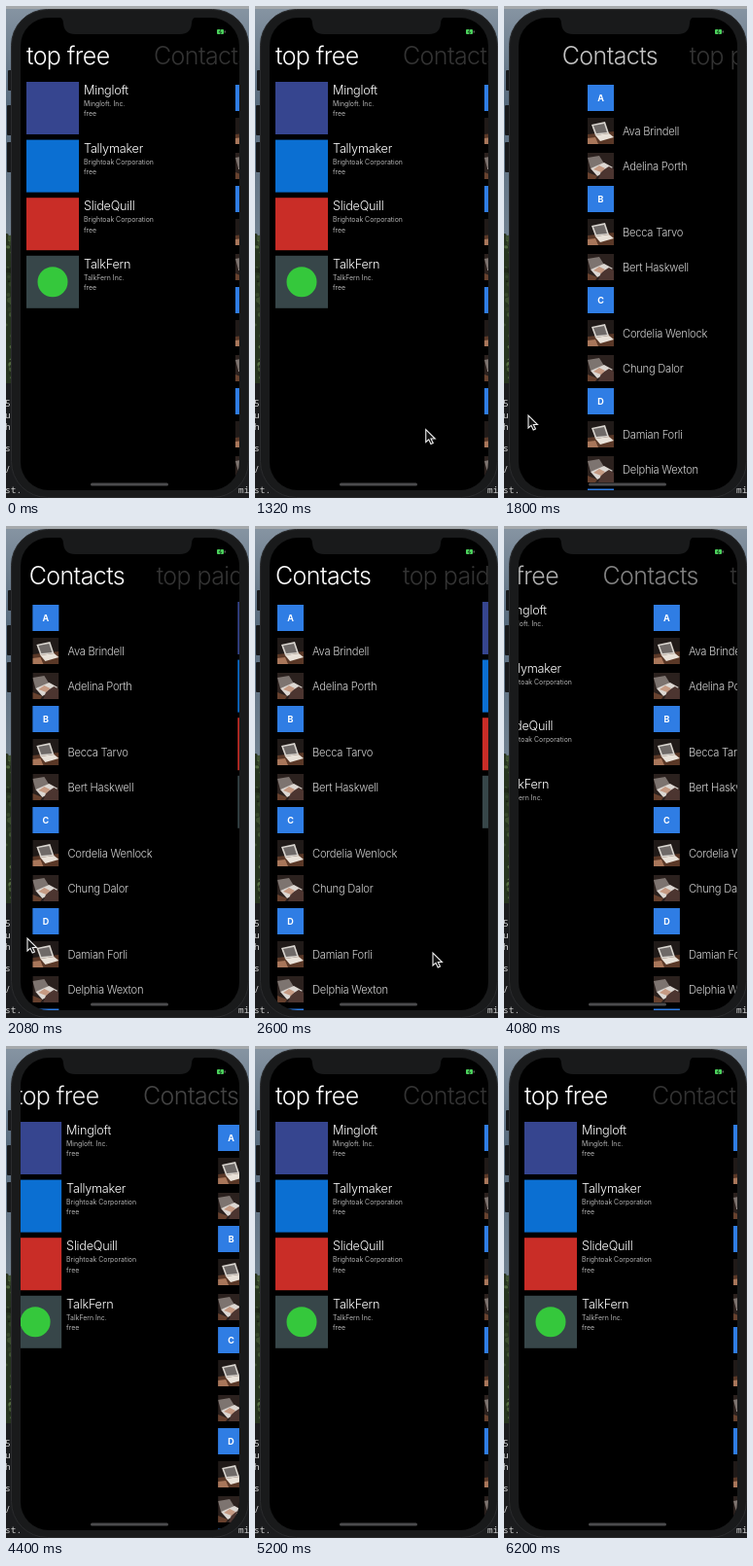
Animation of 250 by 506 pixels, one loop 6.64 s. Source, as an HTML page:

```html
<!DOCTYPE html>
<html lang="en">
<head>
<meta charset="utf-8">
<title>Panorama pages</title>
<style>
  html, body { margin: 0; width: 100%; height: 100%; overflow: hidden; background: #1b1c1e; }
  svg { display: block; }
  text { font-family: Inter, Roboto, sans-serif; font-weight: 300; fill: #fff; }
  .title { font-size: 25px; letter-spacing: -.6px; }
  .app { font-size: 12.7px; letter-spacing: -.25px; }
  .small { font-size: 6.9px; font-weight: 400; fill: #b4b4b4; }
  .letter { font-size: 9px; font-weight: 700; text-anchor: middle; }
  .person { font-size: 11.2px; letter-spacing: -.25px; fill: #d2d2d2; }
  .term text { font: 9.5px "Noto Sans Mono", "DejaVu Sans Mono", monospace; fill: #cfcfcf; }
</style>
</head>
<body>
<svg width="250" height="506" viewBox="0 0 250 506">
  <defs>
    <linearGradient id="sky" x2="0" y2="1">
      <stop offset="0" stop-color="#8795a3"/>
      <stop offset=".25" stop-color="#586b7d"/>
      <stop offset="1" stop-color="#8d99a4"/>
    </linearGradient>
    <clipPath id="screen"><rect x="15" y="12" width="225" height="486" rx="29"/></clipPath>
    <clipPath id="thumb"><rect width="27" height="27"/></clipPath>
    <g id="laptop" clip-path="url(#thumb)">
      <rect width="27" height="27" fill="#201a18"/>
      <path d="M0 17L27 14V27H0z" fill="#5a3827"/>
      <path d="M4 7L18 4L22 16L8 18z" fill="#d9d5cf"/>
      <path d="M6 8L17 6L20 15L9 16z" fill="#6f6a68"/>
      <path d="M8 18L22 16L27 20L13 24z" fill="#e9e2d9"/>
      <path d="M0 21L8 20L11 27H0z" fill="#a8765a"/>
    </g>
    <g id="desk" clip-path="url(#thumb)">
      <rect width="27" height="27" fill="#2b211e"/>
      <path d="M0 5L12 3L17 11L3 16z" fill="#7d7470"/>
      <path d="M3 16L17 10L26 15L10 24z" fill="#dcd7d2"/>
      <path d="M11 27L14 19L22 14L27 17V27z" fill="#4c3530"/>
      <path d="M6 17L12 13L18 16L14 20z" fill="#c59a83"/>
      <path d="M0 20L10 24L8 27H0z" fill="#67412e"/>
    </g>
  </defs>

  <rect width="250" height="400" fill="url(#sky)"/>
  <rect width="250" height="3" fill="#a5a9ac"/>
  <g id="trees"><rect y="238" width="250" height="152" fill="#26341f"/></g>
  <rect y="388" width="250" height="118" fill="#1b1c1e"/>
  <g class="term" id="term"></g>

  <g fill="#17181a">
    <rect x="2" y="66" width="5" height="21" rx="1"/>
    <rect x="1" y="102" width="6" height="31" rx="1"/>
    <rect x="1" y="140" width="6" height="31" rx="1"/>
  </g>
  <rect x="5.5" y="3.5" width="244" height="502" rx="37" fill="#191a1b" stroke="#2a2b2d"/>
  <rect x="15" y="12" width="225" height="486" rx="29"/>

  <g id="pages" clip-path="url(#screen)"></g>

  <path d="M52 11H198Q191 11 191 18Q190 29 179 29H71Q60 29 59 18Q59 11 52 11z" fill="#191a1b"/>
  <rect x="217" y="24" width="7" height="5" rx="1" fill="#4bd05c"/>
  <path d="M221 24L219.500 27H221.500L220.500 29" fill="none" stroke="#0b2a10" stroke-width=".8"/>
  <rect x="224.700" y="25.500" width="1" height="2" fill="#8a8a8a"/>
  <rect x="87" y="490.500" width="80" height="3" rx="1.500" fill="#4b4b4d"/>
  <path id="cursor" d="M0 0V13L3 10.300L5.200 15L7.500 14L5.300 9.500H9.500z" fill="#111" stroke="#eee" stroke-width="1.100"/>
</svg>

<script>
const LOOP = 6640, STEP = 40, PAGE = 213, TITLE_GAP = 131;
const $ = id => document.getElementById(id);
const text = (cls, x, y, s) => `<text class="${cls}" x="${x}" y="${y}">${s}</text>`;
const rect = (x, y, w, h, fill) => `<rect x="${x}" y="${y}" width="${w}" height="${h}" fill="${fill}"/>`;

const apps = [
  ["Mingloft", "Mingloft. Inc.", "#36458f"],
  ["Tallymaker", "Brightoak Corporation", "#0b6fd2"],
  ["SlideQuill", "Brightoak Corporation", "#c92d27"],
  ["TalkFern", "TalkFern Inc.", "#374649"]
];
const people = [
  ["Ava Brindell", "Adelina Porth"],
  ["Becca Tarvo", "Bert Haskwell"],
  ["Cordelia Wenlock", "Chung Dalor"],
  ["Damian Forli", "Delphia Wexton"]
];

const appList = apps.map(([name, maker, color], i) => {
  const y = 78 + i * 59.6;
  return rect(21, y, 54, 54, color) +
    (i == 3 ? `<circle cx="48" cy="${y + 27}" r="15.500" fill="#35c83c"/>` : "") +
    text("app", 80, y + 13, name) +
    text("small", 80, y + 25, maker) +
    text("small", 80, y + 35.3, "free");
}).join("");

const contactList = people.map((pair, i) => {
  const y = 81 + i * 104;
  return rect(23, y, 27, 27, "#2f7de4") +
    text("letter", 36.5, y + 16.8, "ABCD"[i]) +
    pair.map((name, j) => {
      const top = y + 34 + j * 36;
      return `<use href="#${j ? "desk" : "laptop"}" x="23" y="${top}"/>` + text("person", 59, top + 17.5, name);
    }).join("");
}).join("") + rect(23, 496.5, 27, 27, "#2f7de4");

const lists = [appList, contactList, appList];
$("pages").innerHTML = ["top free", "Contacts", "top paid"].map((s, i) =>
  `<g>${text("title", 21, 59.5, s)}</g><g>${lists[i]}</g>`).join("");
const groups = [...$("pages").children];

$("term").innerHTML = [["5", 412], ["u", 424], ["h", 436], ["s", 458], ["/", 480], ["st.", 501]]
  .map(([s, y]) => text("", -1, y, s)).join("") + text("", 239, 501, "mi");

let seed = 7;
const rnd = () => (seed = seed * 16807 % 2147483647) / 2147483647;
let leaves = "";
for (let i = 0; i < 90; i++) {
  const x = rnd() * 7 + (i % 2 ? 244 : 0);
  leaves += `<circle cx="${x}" cy="${236 + rnd() * 150}" r="${1 + rnd() * 2}" fill="hsl(95 25% ${10 + rnd() * 25}%)"/>`;
}
$("trees").innerHTML += leaves;

// Each swipe: start, release, pointer from and to, first page, last page, glide time
const swipes = [
  [1560, 1800, 175, 25, 0, 1, 105],
  [2600, 2820, 183, 20, 1, 2, 50],
  [3640, 3860, 62, 254, 2, 0, 210]
];
// Pointer path: time, x, y
const path = [
  [640, 252, 508], [1240, 176, 436], [1560, 175, 434], [1800, 25, 421], [2080, 22, 424],
  [2480, 183, 439], [2600, 183, 439], [2820, 20, 446], [3000, 28, 446], [3360, 54, 443],
  [3440, 62, 443], [3640, 62, 443], [3860, 254, 436]
];

function pageAt(t) {
  const swipe = swipes.findLast(s => t >= s[0]);
  if (!swipe || t >= 5200) return 0;
  const [start, release, from, to, first, last, glide] = swipe;
  const dragged = first + (from - to) / PAGE;
  if (t < release) return first + (dragged - first) * (t - start) / (release - start);
  return last + (dragged - last) * Math.exp((release - t) / glide);
}

function pointerAt(t) {
  const i = path.findIndex(k => t < k[0]);
  if (i < 1) return [-50, -50];
  const [t0, x0, y0] = path[i - 1], [t1, x1, y1] = path[i];
  const k = (t - t0) / (t1 - t0);
  return [x0 + (x1 - x0) * k, y0 + (y1 - y0) * k];
}

function draw(now) {
  const t = Math.floor(now % LOOP / STEP) * STEP;
  const page = pageAt(t);
  for (let i = 0; i < 3; i++) {
    const off = i - page, title = groups[i * 2], list = groups[i * 2 + 1];
    title.setAttribute("transform", `translate(${off * TITLE_GAP})`);
    title.setAttribute("opacity", 1 - .8 * Math.min(1, Math.abs(off)));
    // Titles sit closer than pages, so one already passed is hidden
    title.setAttribute("visibility", off <= -1 ? "hidden" : "visible");
    list.setAttribute("transform", `translate(${off * PAGE})`);
  }
  $("cursor").setAttribute("transform", `translate(${pointerAt(t)})`);
}

const begin = performance.now();
function tick() {
  draw(performance.now() - begin);
  requestAnimationFrame(tick);
}
tick();
</script>
</body>
</html>
```
